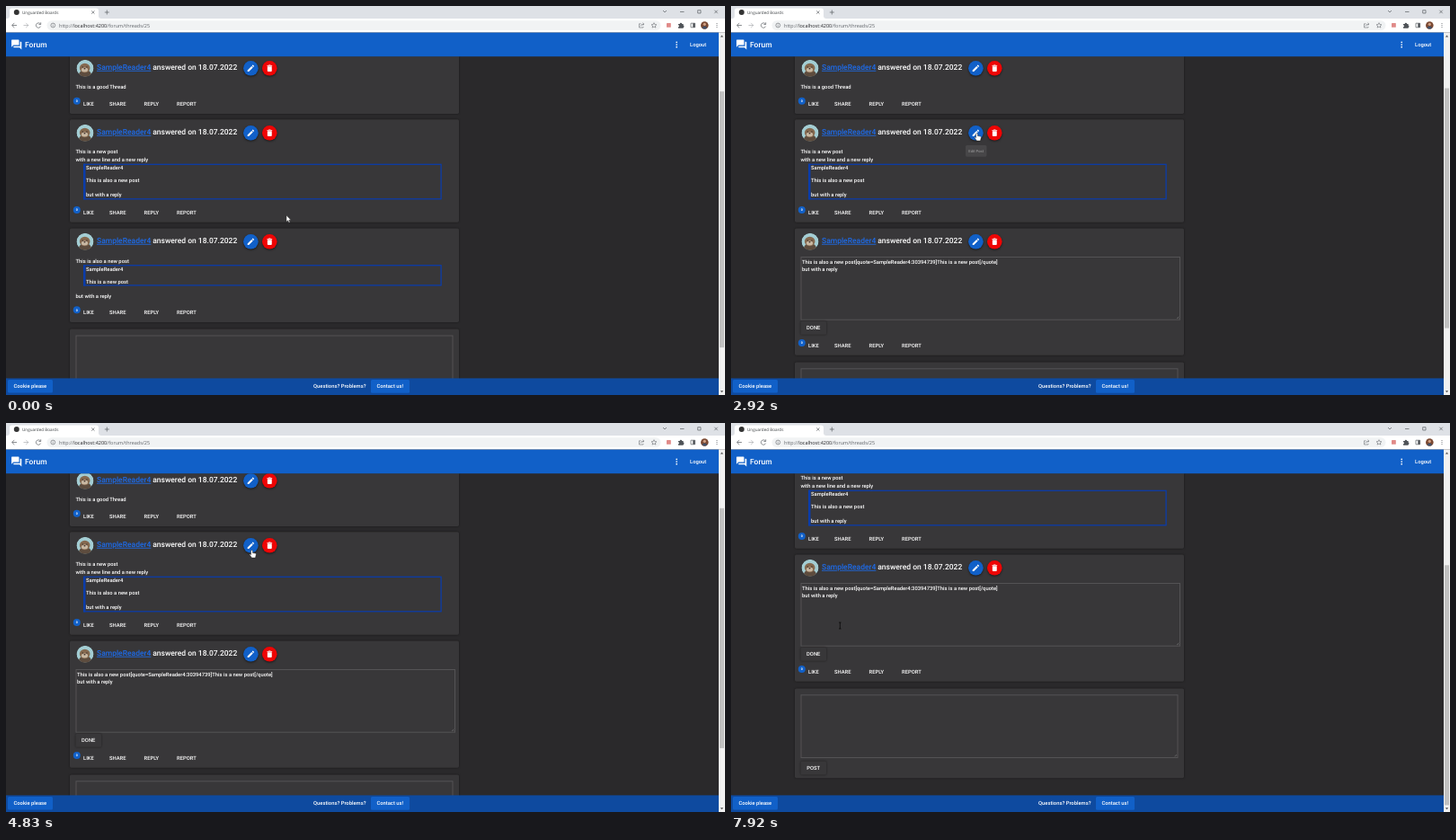
Animation of 800x433 px, one loop 8 s. Source, as an HTML page:

```html
<!DOCTYPE html>
<html lang="en">
<head>
<meta charset="utf-8">
<title>Forum thread</title>
<style>
html, body { margin: 0; width: 100%; height: 100%; overflow: hidden; background: #2a292b; }
svg { display: block; width: 100%; height: 100%; }
text { font: 500 5.83px Roboto, sans-serif; fill: #fff; text-rendering: geometricPrecision; white-space: pre; }
.title { font-size: 8.5px; }
.link { fill: #1d6cec; text-decoration: underline; }
.mid { text-anchor: middle; }
.tip { font-size: 4.17px; }
.badge { font-size: 3.6px; font-weight: 700; }
.chrome { font: 400 5.5px "Open Sans", sans-serif; fill: #5f6368; }
.tab { font-size: 4.6px; fill: #3c4043; }
.line { fill: none; stroke: #5b5f64; stroke-width: .7; }
.box { fill: none; stroke: #545355; stroke-width: 1; }
.card { fill: #383739; filter: drop-shadow(0 .8px .9px #0007); }
.round { filter: drop-shadow(0 1.2px 1.2px #0008); }
</style>
</head>
<body>
<svg id="stage" viewBox="0 0 800 433" preserveAspectRatio="none"></svg>
<script>
const USER = 'SampleReader4';
const BLUE = '#1160c8';
const PAGE_TOP = 29.6, BAR_BOTTOM = 56.2;
const PENCIL = 'M3 17.25V21h3.75L17.81 9.94l-3.75-3.75L3 17.25zM20.71 7.04c.39-.39.39-1.02 0-1.41l-2.34-2.34c-.39-.39-1.02-.39-1.41 0l-1.83 1.83 3.75 3.75 1.83-1.83z';
const TRASH = 'M6 19c0 1.1.9 2 2 2h8c1.1 0 2-.9 2-2V7H6v12zM19 4h-3.5l-1-1h-5l-1 1H5v2h14V4z';
const SPEECH = 'M21 6h-2v9H6v2c0 .55.45 1 1 1h11l4 4V7c0-.55-.45-1-1-1zm-4 6V3c0-.55-.45-1-1-1H3c-.55 0-1 .45-1 1v14l4-4h10c.55 0 1-.45 1-1z';

// y is the vertical centre of the capital letters
const text = (x, y, s, cls = '') => `<text x="${x}" y="${y + (cls.includes('title') ? 3 : 2.1)}" class="${cls}">${s}</text>`;
const rect = (x, y, w, h, fill, r = 0, extra = '') =>
  `<rect x="${x}" y="${y}" width="${w}" height="${h}" rx="${r}" fill="${fill}" ${extra}/>`;
const circle = (x, y, r, fill, extra = '') => `<circle cx="${x}" cy="${y}" r="${r}" fill="${fill}" ${extra}/>`;
const ellipse = (x, y, rx, ry, fill) => `<ellipse cx="${x}" cy="${y}" rx="${rx}" ry="${ry}" fill="${fill}"/>`;
const line = (d, extra = '') => `<path class="line" d="${d}" ${extra}/>`;
const icon = (x, y, scale, d) =>
  `<path transform="translate(${x} ${y}) scale(${scale}) translate(-12 -12)" d="${d}" fill="#fff"/>`;
const group = (id, body) => `<g id="${id}">${body}</g>`;
const card = (y, h) => rect(71, y, 433, h, '', 1.7, 'class="card"');

const avatar = y => `<g transform="translate(88 ${y})" clip-path="url(#disc)">
  ${circle(0, 0, 9.5, '#a3cdd3')}${ellipse(0, 9, 7.5, 7.5, '#5d4c3e')}${ellipse(-.3, -.3, 5.8, 5.2, '#85694f')}
  ${ellipse(-.5, 1.6, 3.6, 2.5, '#c9b8a2')}${ellipse(-.5, .5, 1.1, .8, '#3a2f2a')}
  ${circle(-2.8, -1.4, .6, '#2d2522')}${circle(2, -1.4, .6, '#2d2522')}</g>`;

const roundButton = (x, y, fill, d) => circle(x, y, 8.3, fill, 'class="round"') + icon(x, y, .41, d);

const header = y => avatar(y) + text(101, y - 1.5, USER, 'title link') +
  text(163.2, y - 1.5, 'answered on 18.07.2022', 'title') +
  roundButton(272.4, y, BLUE, PENCIL) + roundButton(293.3, y, '#ee0505', TRASH);

const actions = y => circle(78.8, y - 2.9, 4, BLUE) + text(78.8, y - 3.7, '0', 'badge mid') +
  [[86, 'LIKE'], [115, 'SHARE'], [153.5, 'REPLY'], [190, 'REPORT']].map(([x, s]) => text(x, y, s)).join('');

const quote = (y, h, rows) => `<rect x="86.800" y="${y}" width="397.300" height="${h}" fill="none" stroke="#0a3cab" stroke-width="1.250"/>` +
  rect(86, y - .6, 2.5, h + 1.2, '#0a3cab') + rows.map(([dy, s]) => text(89, y + dy, s)).join('');

const textarea = (y, w) => rect(78, y, w, 69.7, '', 0, 'class="box"') +
  `<path d="M${74.5 + w} ${y + 68.5}l2.3-2.3m-.8 2.3l.8-.8" stroke="#999" stroke-width=".4"/>`;
const flatButton = (y, label) => rect(77.5, y - 7.5, 28.5, 15, '#383739', 1.5, 'class="card"') + text(91.7, y, label, 'mid');

const thread = card(50, 70) + header(69.3) + text(77.5, 90.3, 'This is a good Thread') + actions(108.7) +
  card(126.3, 114.4) + header(141.3) +
  text(77.5, 162.3, 'This is a new post') + text(77.5, 170.7, 'with a new line and a new reply') +
  quote(176.3, 38.5, [[3.9, USER], [17.3, 'This is also a new post'], [34, 'but with a reply']]) + actions(230) +
  group('reading', card(247.5, 104.5) + header(262.3) + text(77.5, 283.7, 'This is also a new post') +
    quote(288.700, 22.2, [[4.3, USER], [17.7, 'This is a new post']]) + text(77.5, 322.9, 'but with a reply') + actions(341.2)) +
  group('editing', card(247.5, 141.3) + header(262.3) + textarea(279.5, 421.5) +
    text(79, 285, `This is also a new post[quote=${USER}:30394739]This is a new post[/quote]`) +
    text(79, 293.3, 'but with a reply') + flatButton(358.2, 'DONE') + actions(377.8)) +
  group('composer', card(359.6, 99.8) + textarea(367, 419) + flatButton(448.3, 'POST'));

const browser = rect(0, 0, 800, 14, '#dee1e6') +
  '<path d="M1 14Q4 14 4 11V5Q4 2.500 6.500 2.500H100Q103 2.500 103 5V11Q103 14 106 14Z" fill="#fff"/>' +
  rect(0, 14, 800, PAGE_TOP - 14, '#fff') + circle(11.8, 7, 3, '#333') + text(18, 7, 'Unguarded Boards', 'chrome tab') +
  line('M95.200 5.400l3.300 3.300m0-3.300l-3.300 3.300M112.300 4.500v5m-2.500-2.500h5') +
  line('M731 5l2 2 2-2M750 6.500h4.500M769.700 4.700h3.300v3.300h-3.300zM788.300 4.700l3.500 3.500m0-3.500l-3.500 3.500') +
  line('M12 21.500H6.800m2.500-2.600l-2.600 2.600 2.600 2.600') +
  line('M19.500 21.500h5.200m-2.500-2.600l2.600 2.600-2.600 2.600', 'opacity=".5"') +
  line('M38.300 20a2.700 2.700 0 1 0 .3 2.600M38.700 18.300v2.200h-2.200') +
  rect(45.5, 16.2, 683, 10.8, '#f1f3f4', 5.4) +
  line('M49.900 21.500a2.400 2.400 0 1 0 4.800 0a2.400 2.400 0 1 0-4.800 0M52.300 21.200v1.500M52.300 19.900v.5', 'style="stroke-width:.6"') +
  text(59, 21.5, 'http://<tspan fill="#202124">localhost:4200</tspan>/forum/threads/25', 'chrome') +
  line('M706.500 19.800h-2v4.200h4.500V23M706 22.500q.4-2.300 3.700-2.300m-1.300-1.400l1.600 1.400-1.600 1.400', 'style="stroke-width:.55"') +
  line('M721 18.700l.9 1.900 2 .2-1.500 1.300.5 2-1.900-1.100-1.900 1.100.5-2-1.500-1.300 2-.2z', 'style="stroke-width:.55"') +
  rect(735, 19, 4.8, 4.8, '#e08a88', .6) +
  '<path d="M748 20h1.700a1.200 1.200 0 0 1 2.400 0h1.500v1.600a1.200 1.200 0 0 1 0 2.300v.800h-5.600v-1.500a1 1 0 0 0 0-2z" fill="#4f5358"/>' +
  line('M762 19.200h4.600v4.600h-4.600z') + rect(764.3, 19.2, 2.3, 4.6, '#4f5358') +
  circle(777.3, 21.5, 4.3, '#7b4932') + circle(777.3, 20.3, 1.6, '#d0a184') + ellipse(777.3, 24, 2.5, 1.5, '#40506a') +
  [19.5, 21.5, 23.5].map(y => circle(791, y, .5, '#4f5358')).join('');

const appBar = rect(0, PAGE_TOP, 793, BAR_BOTTOM - PAGE_TOP, BLUE) + icon(11.7, 43, .56, SPEECH) +
  text(21, 43, 'Forum', 'title') + [40.3, 43, 45.7].map(y => circle(746.2, y, .85, '#fff')).join('') + text(761, 42.7, 'Logout');

const footer = rect(0, 414.4, 793, 18.6, '#0e4a9f') + rect(2, 416, 50, 14.6, BLUE, 1.5) + text(8.5, 423, 'Cookie please') +
  text(342, 423.3, 'Questions? Problems?') + rect(406, 416, 43, 14.8, BLUE, 1.5) + text(412.4, 423.3, 'Contact us!');

const scrollbar = rect(793, PAGE_TOP, 7, 433 - PAGE_TOP, '#f1f1f1') + rect(794, 0, 5, 10, '#c1c1c1', 0, 'id="thumb"') +
  '<path d="M794.800 34.500l1.700-2 1.700 2zM794.800 428.200l1.700 2 1.700-2z" fill="#505050"/>';

const tooltip = (id, y) => group(id, rect(261, y, 23.5, 12.8, '#5d5c5e', 1.6) + text(272.7, y + 5.8, 'Edit Post', 'tip mid'));

const shapes = {
  arrow: '<path d="M0 0V7.200L1.700 5.700 2.800 8.200 3.900 7.700 2.800 5.300H5Z" fill="#fff" stroke="#222" stroke-width=".4"/>',
  hand: '<path d="M-1 .8Q0-.6 1 .8V3L4 3.600Q5 4 4.800 5L4 8.600H0L-2.600 5Q-2.400 4-1 5Z" fill="#fff" stroke="#222" stroke-width=".5"/>',
  beam: '<path d="M-1.200-3.500H1.200M0-3.500V3.500M-1.200 3.500H1.200" stroke="#000" stroke-width=".7"/>'
};

document.getElementById('stage').innerHTML =
  `<defs><clipPath id="disc"><circle r="9.5"/></clipPath><clipPath id="view">${rect(0, BAR_BOTTOM, 793, 359, '')}</clipPath></defs>` +
  rect(0, 0, 800, 433, '#2a292b') + `<g clip-path="url(#view)">${group('thread', thread)}</g>` +
  browser + appBar + footer + scrollbar + tooltip('tipLow', 276.8) + tooltip('tipHigh', 154.9) +
  group('pointer', Object.entries(shapes).map(([id, s]) => group(id, s)).join(''));

const get = id => document.getElementById(id);
const show = (id, on) => get(id).setAttribute('visibility', on ? 'visible' : 'hidden');
const move = (id, x, y) => get(id).setAttribute('transform', `translate(${x} ${y})`);

const CLICK = 830, LOOP = 8000, FPS = 12;
const pointerPath = [
  [0, 312, 233, 'arrow'], [600, 276.5, 260, 'hand'], [1250, 276.5, 260, 'hand'], [1420, 278, 249, 'arrow'],
  [2080, 277, 199, 'arrow'], [2440, 273.5, 141.5, 'hand'], [2920, 273.5, 141.5, 'hand'],
  [3400, 282, 138, 'arrow'], [3600, 282, 138, 'arrow'], [3800, 276, 140, 'hand'], [4000, 276, 140, 'hand'],
  [4400, 273.5, 141.5, 'hand'], [5050, 273.5, 141.5, 'arrow'], [5500, 146, 309, 'arrow'],
  [5800, 109.7, 307, 'arrow'], [7670, 109.7, 307, 'beam'], [7900, 121.3, 225.5, 'beam']
];
const lowFade = [[580, 0], [750, 1], [1250, 1], [1420, 0]];
const highFade = [[2350, 0], [2500, 1], [2840, 1], [2980, 0]];
const scrollPath = [[4700, 0], [5050, 101]];

// Smooth interpolation between timed keys
function track(keys, t) {
  const i = keys.findIndex(k => k[0] > t);
  if (i < 0) return keys[keys.length - 1].slice(1);
  if (i === 0) return keys[0].slice(1);
  const a = keys[i - 1], b = keys[i];
  const p = (1 - Math.cos(Math.PI * (t - a[0]) / (b[0] - a[0]))) / 2;
  return a.slice(1).map((v, j) => typeof v === 'number' ? v + (b[j + 1] - v) * p : v);
}

function draw(now) {
  const t = Math.floor((now % LOOP) * FPS / 1000 + .02) * 1000 / FPS;
  const editing = t >= CLICK;
  const [scroll] = track(scrollPath, t);
  const pageHeight = editing ? 587 : 550;

  show('reading', !editing);
  show('editing', editing);
  move('composer', 0, editing ? 36.8 : 0);
  move('thread', 0, -scroll);
  get('thumb').setAttribute('y', 38 + (81 + scroll) / pageHeight * 388);
  get('thumb').setAttribute('height', 404 / pageHeight * 388);
  get('tipLow').setAttribute('opacity', track(lowFade, t)[0]);
  get('tipHigh').setAttribute('opacity', track(highFade, t)[0]);

  const [x, y, kind] = track(pointerPath, t);
  move('pointer', x, y);
  for (const id in shapes) show(id, id === kind);
  requestAnimationFrame(draw);
}
requestAnimationFrame(draw);
</script>
</body>
</html>
```
